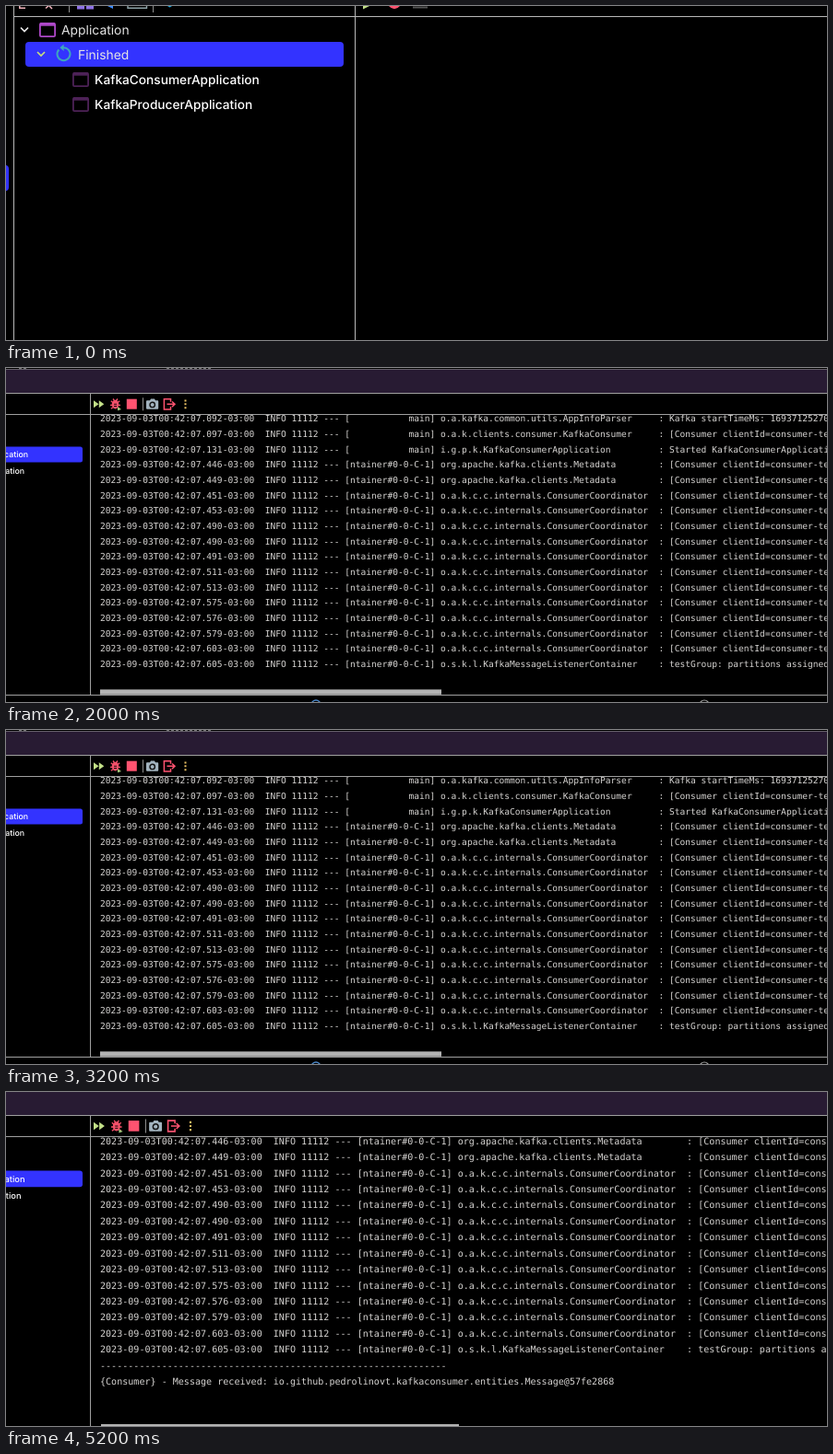
An HTML page that plays this animation: 890 by 363 pixels, repeating every 6000 ms.

```html
<!DOCTYPE html>
<html lang="en">
<head>
<meta charset="utf-8">
<title>Run console</title>
<style>
  html, body { margin: 0; width: 100%; height: 100%; overflow: hidden; background: #000; }
  svg { display: block; width: 890px; height: 363px; }
  text { white-space: pre; text-rendering: geometricPrecision; }
  .ui { font-family: Inter, sans-serif; fill: #fff; }
  .log { font-family: "DejaVu Sans Mono", "Noto Sans Mono", monospace; fill: #d6d4d2; }
  .rule { stroke: #b9b9b9; fill: none; shape-rendering: crispEdges; }
  #started .rule, #received .rule { stroke: #a0a0a0; }
  .bar { fill: #281b33; }
  .pick { fill: #3333ff; }
  .scroll { fill: #b3b3b3; }
  .scene { visibility: hidden; animation: show 6s step-end infinite; }
  #started { animation-delay: -4s; }
  #received { animation-delay: -2s; }
  @keyframes show {
    0% { visibility: visible; }
    33.3333%, 100% { visibility: hidden; }
  }
</style>
</head>
<body>
<svg viewBox="0 0 890 363">
  <defs>
    <g id="window" fill="none" stroke="currentColor">
      <rect x=".9" y=".9" width="16.2" height="14.2" rx="1.2" stroke-width="1.8"/>
      <path d="M1 2H17" stroke-width="3.4"/>
    </g>
    <path id="chevron" d="M0 0L4 4L8 0" fill="none" stroke="currentColor" stroke-width="1.7"/>
    <!-- Toolbar icons, centred on y = 0 -->
    <g id="tools">
      <path d="M0-4L5.5 0L0 4ZM5.8-4L11.3 0L5.8 4Z" fill="#c3e088"/>
      <g stroke="#f4506a" fill="none" stroke-width="1.3">
        <ellipse cx="23.5" cy=".3" rx="3.8" ry="4.8" fill="#f4506a" stroke="none"/>
        <path d="M18 1H29M18.8-3.5L21-1.5M28.2-3.5L26-1.5M18.8 5L21 3.4M28.2 5L26 3.4M21-5.8L22.5-3.8M26-5.8L24.5-3.8"/>
        <path d="M22 0H25M22 2.2H25" stroke="#000" stroke-width=".9"/>
        <path d="M26 3L30 5.6L26 7Z" fill="#9fc87a" stroke="none"/>
      </g>
      <rect x="35.8" y="-5.6" width="11" height="11" fill="#ff5370"/>
      <path d="M53.5-7V7" stroke="#8f8f8f"/>
      <path d="M58-4H61L62-5.7H66L67-4H69.2Q70.2-4 70.2-3V4.5Q70.2 5.5 69.2 5.5H58Q57 5.5 57 4.5V-3Q57-4 58-4Z" fill="#a3b4bf"/>
      <circle cx="63.7" cy=".6" r="2.7" fill="#a3b4bf" stroke="#111" stroke-width="1.4"/>
      <path d="M83.5-2.6V-5.6H76.4V5.6H83.5V2.6M79.5 0H87.5M85-2.8L88 0L85 2.8" fill="none" stroke="#ff5370" stroke-width="1.5"/>
      <path d="M98.5-4.9h2v2h-2zM98.5-1h2v2h-2zM98.5 2.9h2v2h-2z" fill="#e6bd62"/>
    </g>
  </defs>

  <g class="scene" id="tree">
    <path class="rule" d="M8.5 0V363M378.5 0V363M9 11.5H890"/>
    <path d="M68.5 0V7M159.5 0V7" stroke="#8f8f8f"/>
    <path d="M14.8 0V2.3H21M43 2.5L46 0M47 0L50 3" fill="none" stroke="#f3b4bc" stroke-width="1.5"/>
    <path d="M77 0H85V3.5H77ZM87 0H95V3.5H87Z" fill="#8f72e6"/>
    <path d="M110 0H116V3Z" fill="#3d8bff"/>
    <path d="M132 0V2.3H152.5V0" fill="none" stroke="#8fa3a8" stroke-width="1.4"/>
    <path d="M175 0H180L177.5 1.5Z" fill="#20a9e0"/>
    <path d="M387 0H394L387 3.5Z" fill="#c3e088"/>
    <path d="M415 0Q421 6.5 427 0Z" fill="#ff5370"/>
    <path d="M441 1.5H457" stroke="#545454" stroke-width="2"/>
    <rect class="pick" x="-6" y="173" width="9" height="28" rx="4"/>
    <rect class="pick" x="21" y="39" width="345" height="27" rx="4"/>
    <use href="#chevron" x="16" y="23.5" color="#e8e8e8"/>
    <use href="#chevron" x="34" y="50" color="#c9e07c"/>
    <use href="#window" x="36" y="18" color="#ae48c8"/>
    <use href="#window" x="72" y="72" color="#4d2257"/>
    <use href="#window" x="72" y="99" color="#4d2257"/>
    <path d="M57.3 47.5A7 7 0 1 0 62 45.2" fill="none" stroke="#3da7bd" stroke-width="2"/>
    <path d="M62.6 41.5V49L58.4 45.2Z" fill="#3da7bd"/>
    <g class="ui" font-size="13.9">
      <text x="60" y="31" fill="#e4e4e4">Application</text>
      <text x="78" y="58" fill="#e4e4e4">Finished</text>
      <g font-size="13.7" font-weight="500">
        <text x="96" y="84.7">KafkaConsumerApplication</text>
        <text x="96" y="111.7">KafkaProducerApplication</text>
      </g>
    </g>
  </g>

  <g class="scene" id="started">
    <path class="rule" d="M0 1.5H890" style="stroke:#66616b"/>
    <path d="M14 .5H23M174 .5H224" stroke="#777" stroke-dasharray="3 2"/>
    <rect class="bar" y="2" width="890" height="25"/>
    <rect class="pick" x="-6" y="85.5" width="89" height="17" rx="2.5"/>
    <g class="ui" font-size="8.8" font-weight="500" text-anchor="end">
      <text x="24" y="97.4">KafkaConsumerApplication</text>
      <text x="20" y="114.7">KafkaProducerApplication</text>
    </g>
    <g class="log" font-size="9.59"></g>
    <path class="rule" d="M0 27.5H890M0 50.5H890M91.5 27V355M0 355.5H890"/>
    <use href="#tools" transform="translate(95 39.3)"/>
    <rect class="scroll" x="102" y="349.4" width="370" height="5.4"/>
    <circle cx="336" cy="366" r="5" fill="none" stroke="#4a86c8" stroke-width="1.3"/>
    <circle cx="757" cy="366" r="5" fill="none" stroke="#9a9a9a" stroke-width="1.2"/>
  </g>

  <g class="scene" id="received">
    <rect class="bar" width="890" height="25"/>
    <rect class="pick" x="-6" y="85.5" width="89" height="17.7" rx="3"/>
    <g class="ui" font-size="9.3" font-weight="500" text-anchor="end">
      <text x="20.5" y="97.8">KafkaConsumerApplication</text>
      <text x="16.5" y="116.2">KafkaProducerApplication</text>
    </g>
    <g class="log" font-size="10.07"></g>
    <path class="rule" d="M0 25.5H890M0 48.5H890M91.5 25V363"/>
    <use href="#tools" transform="translate(95 37) scale(1.055)"/>
    <rect class="scroll" x="103" y="361" width="388" height="2"/>
  </g>
</svg>
<script>
  const worker = "ntainer#0-0-C-1";
  const client = "[Consumer clientId=consumer-testGroup-1, groupId=testGroup]";

  const entry = (ms, thread, logger, message) =>
    `2023-09-03T00:42:07.${ms}-03:00  INFO 11112 --- [${thread.padStart(15)}] ${logger.padEnd(40)} : ${message}`;

  const startup = [
    entry("092", "main", "o.a.kafka.common.utils.AppInfoParser", "Kafka startTimeMs: 1693712527090"),
    entry("097", "main", "o.a.k.clients.consumer.KafkaConsumer", client),
    entry("131", "main", "i.g.p.k.KafkaConsumerApplication", "Started KafkaConsumerApplication"),
  ];
  const group = [
    ...["446", "449"].map(ms => entry(ms, worker, "org.apache.kafka.clients.Metadata", client)),
    ..."451 453 490 490 491 511 513 575 576 579 603".split(" ")
      .map(ms => entry(ms, worker, "o.a.k.c.c.internals.ConsumerCoordinator", client)),
    entry("605", worker, "o.s.k.l.KafkaMessageListenerContainer", "testGroup: partitions assigned: [test-topic-0]"),
  ];
  const message = [
    "-".repeat(62),
    "{Consumer} - Message received: io.github.pedrolinovt.kafkaconsumer.entities.Message@57fe2868",
  ];

  function print(scene, lines, top, step) {
    const log = document.querySelector(`#${scene} .log`);
    lines.forEach((line, i) => {
      const text = document.createElementNS("http://www.w3.org/2000/svg", "text");
      text.setAttribute("x", 102);
      text.setAttribute("y", top + i * step);
      text.textContent = line;
      log.append(text);
    });
  }

  print("started", [...startup, ...group], 58.4, 16.66);
  print("received", [...group, ...message], 56.8, 17.42);
</script>
</body>
</html>
```
